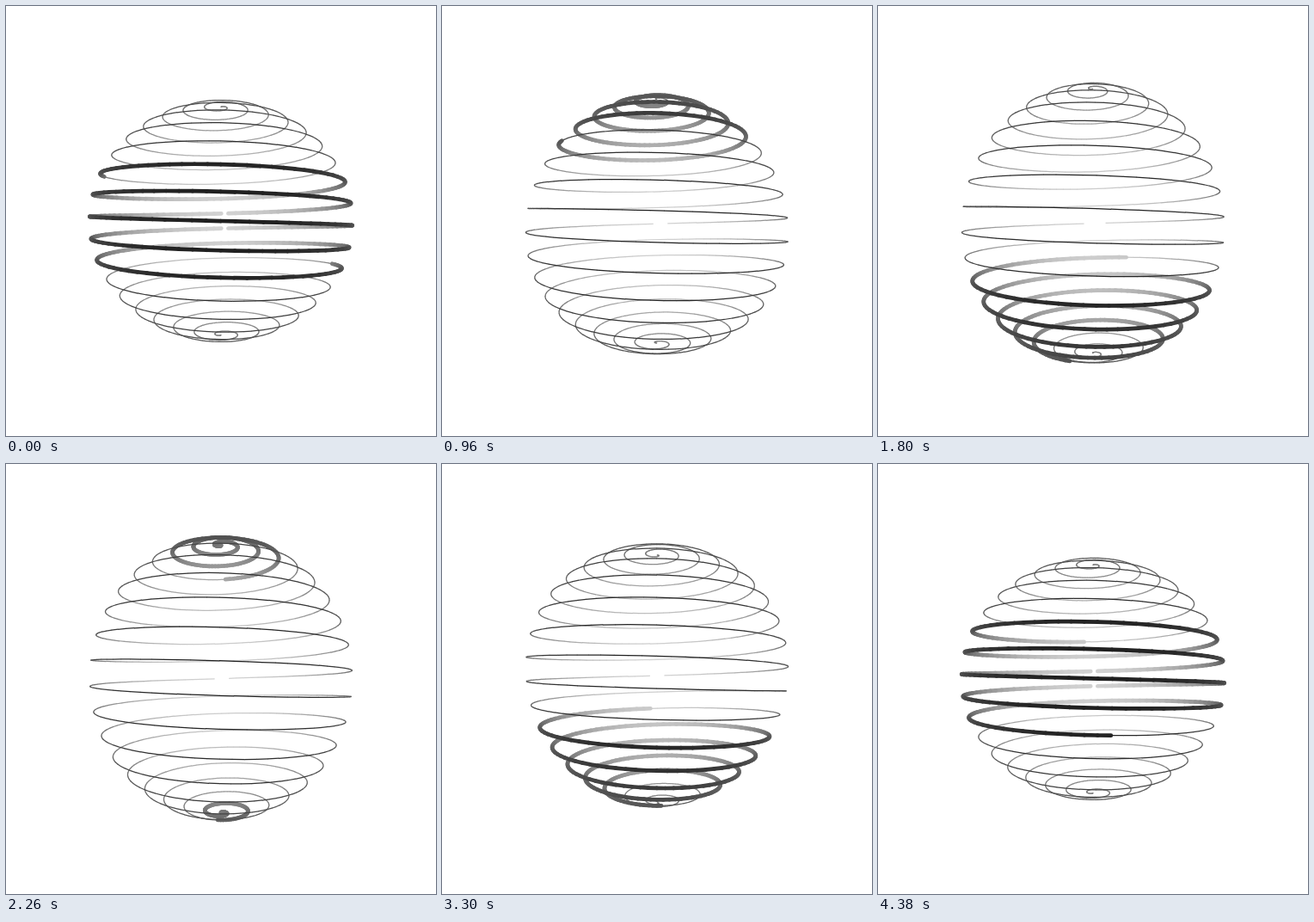
These frames come from a looping animation (500x500 px, 4.4 s). An HTML page with a canvas:

```html
<!DOCTYPE html>
<html lang="en">
<head>
<meta charset="utf-8">
<title>Spiral sphere</title>
<style>
  html, body { margin: 0; width: 100%; height: 100%; overflow: hidden; background: #fff; }
  canvas { display: block; width: 500px; height: 500px; }
</style>
</head>
<body>
<canvas id="stage" width="500" height="500"></canvas>
<script>
const LOOP = 4400;
const TAU = Math.PI * 2;
const MID = 250;
const R = 144;          // sphere radius
const EYE = 433;        // camera distance
const WAVE = 11.5;      // height of the vertical wave
const TURNS = 18;
const STEPS = TURNS * 80;
const BAND = 0.25;      // share of the spiral drawn bold
const THIN = 1.25, BOLD = 4.7;

const canvas = document.getElementById('stage');
const ctx = canvas.getContext('2d');
const dpr = window.devicePixelRatio || 1;
canvas.width = canvas.height = 500 * dpr;

const fract = v => v - Math.floor(v);

// Point on the spiral: u runs from the top pole (0) to the bottom pole (1).
function point(u, p) {
  const lat = (u - 0.5) * Math.PI;
  const turn = TURNS * TAU * (u - 0.5) - TAU * p;
  const ring = R * Math.cos(lat);
  const y = R * Math.sin(lat) + WAVE * Math.sin(TAU * p - lat);
  const z = ring * Math.cos(turn);
  const k = EYE / (EYE - z);
  return {
    x: MID + ring * Math.sin(turn) * k,
    y: MID + y * k,
    z,
    far: -ring * Math.cos(turn + 0.06) / R
  };
}

function draw(p) {
  ctx.setTransform(dpr, 0, 0, dpr, 0, 0);
  ctx.fillStyle = '#fff';
  ctx.fillRect(0, 0, 500, 500);

  const parts = [];
  let a = point(0, p);
  for (let i = 1; i <= STEPS; i++) {
    const b = point(i / STEPS, p);
    const bold = Math.abs(fract((i - 0.5) / STEPS - 3 * p) - 0.5) < BAND / 2;
    // The farthest stretch fades out completely.
    if (a.far < 0.9945) parts.push({ a, b, bold, z: (a.z + b.z) / 2 });
    a = b;
  }
  parts.sort((m, n) => m.z - n.z);

  for (const { a, b, bold, z } of parts) {
    const g = Math.round(120 - 90 * z / R);
    const dx = b.x - a.x, dy = b.y - a.y;
    const e = 0.2 / (Math.hypot(dx, dy) || 1);
    ctx.strokeStyle = `rgb(${g},${g},${g})`;
    ctx.lineWidth = bold ? BOLD : THIN;
    ctx.lineCap = bold ? 'round' : 'butt';
    ctx.beginPath();
    ctx.moveTo(a.x - dx * e, a.y - dy * e);
    ctx.lineTo(b.x + dx * e, b.y + dy * e);
    ctx.stroke();
  }
}

function frame() {
  draw((performance.now() % LOOP) / LOOP);
  requestAnimationFrame(frame);
}
frame();
</script>
</body>
</html>
```
